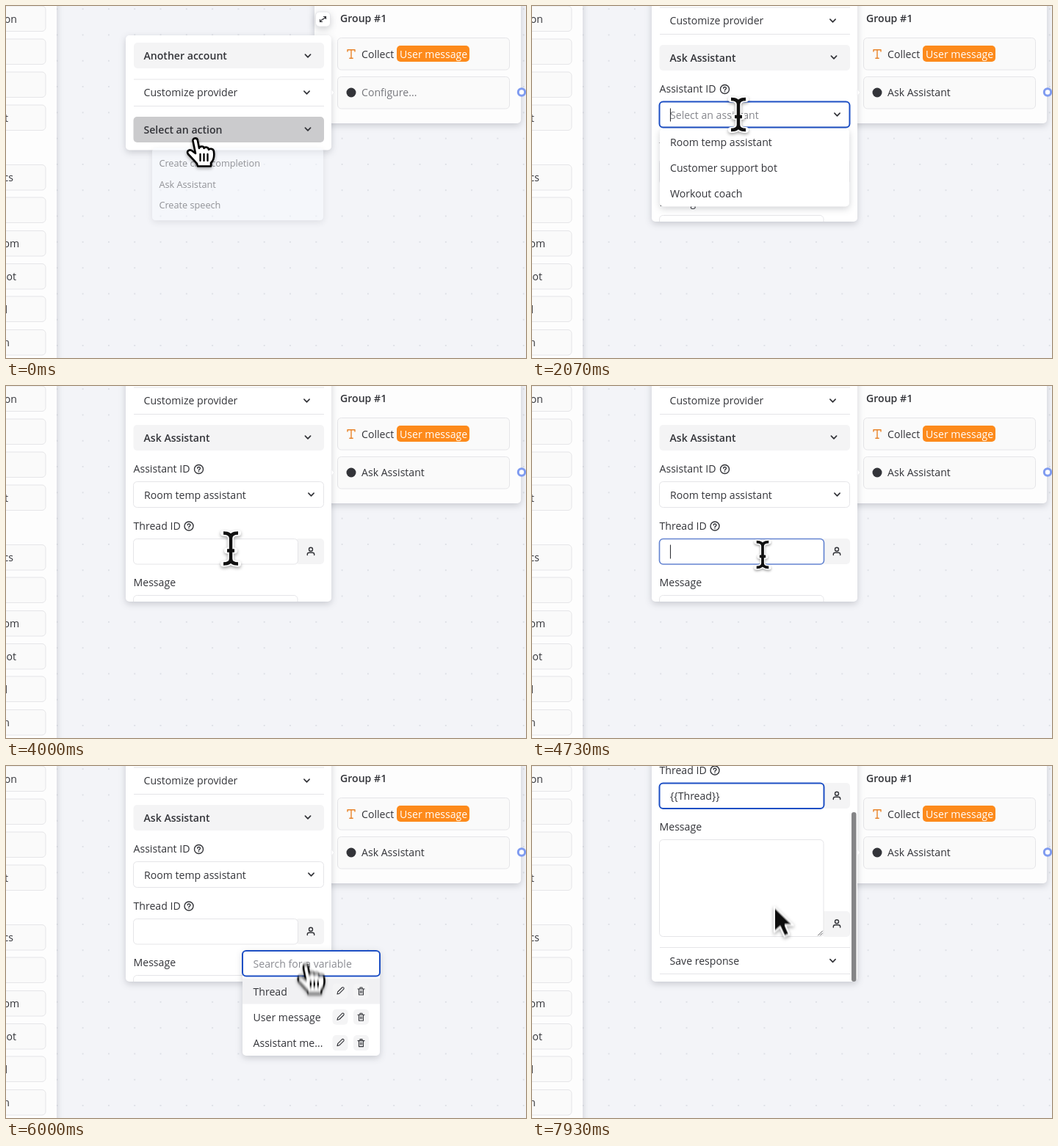
Animation, 708 px wide and 480 px high, one loop 8 s. Source, as an HTML page:

```html
<!DOCTYPE html>
<html lang="en">
<head>
<meta charset="utf-8">
<title>Assistant setup</title>
<style>
html, body { margin: 0; width: 100%; height: 100%; overflow: hidden; background: #f3f4f8; }
svg { display: block; width: 708px; height: 480px; font: 14.1px "Open Sans", "Noto Sans", sans-serif; }
.soft { filter: drop-shadow(0 3px 5px rgba(30, 35, 50, .2)); }
.line { fill: none; stroke: #333439; stroke-width: 1.4; stroke-linecap: round; stroke-linejoin: round; }
#cursor { filter: drop-shadow(0 2px 2px rgba(0, 0, 0, .35)); }
</style>
</head>
<body>
<svg id="stage" viewBox="0 0 708 480"></svg>
<script>
const LOOP = 8000, INK = '#333439', PALE = '#f4f4f5', EDGE = '#e5e5e8', BLUE = '#1d4fc4';
const $ = id => document.getElementById(id);

// Drawing helpers; text is placed by the middle of its line.
const text = (x, y, s, o = '') => `<text x="${x}" y="${y + 5}" fill="${INK}" ${o}>${s}</text>`;
const bold = (x, y, s, o = '') => text(x, y, s, 'font-weight="600" ' + o);
const label = (x, y, s) => text(x, y, s, 'font-weight="500"');
const box = (x, y, w, h, fill, o = '') => `<rect x="${x}" y="${y}" width="${w}" height="${h}" rx="5" fill="${fill}" ${o}/>`;
const framed = (x, y, w, h, fill = '#fff', o = '') => box(x, y, w, h, fill, `stroke="${EDGE}" ` + o);
const path = (d, o = 'class="line"') => `<path d="${d}" ${o}/>`;
const rule = y => path(`M174 ${y}H433`, `stroke="${EDGE}"`);
const chevron = (x, y) => path(`M${x - 3.6} ${y - 1.8}l3.6 3.6l3.6 -3.6`, 'class="line" style="stroke-width:1.7"');
const help = (x, y) => `<circle cx="${x}" cy="${y}" r="6" class="line"/>` +
  path(`M${x - 1.8} ${y - 1.3}c0 -2.4 3.8 -2.2 3.8 0c0 1.5 -2 1.4 -2 2.8m0 1.6v.1`);
const person = (x, y) => `<circle cx="${x}" cy="${y - 2.8}" r="2.5" class="line"/>` +
  path(`M${x - 4.7} ${y + 5}v-1q0 -2.3 2.4 -2.3h4.6q2.4 0 2.4 2.3v1`);
const pencil = (x, y) => path(`M${x - 4} ${y + 4}l.7 -3l6 -6q1.2 -.6 2 .2t.2 2l-6 6z`, 'class="line" style="stroke-width:1.1"');
const trash = (x, y) => path(`M${x - 4.5} ${y - 3}h9m-6 0v-2h3v2m-4.5 0v8h6v-8m-4 2.5v3m2 -3v3`, 'class="line" style="stroke-width:1.1"');
const group = (id, body, o = '') => `<g id="${id}" ${o}>${body}</g>`;

const sideRows = [[17, 'on', 15], [62, '', 0], [107, '', 0], [152, 't', 3], [233.5, 'cs', 10], [278, '', 0],
  [323.5, 'om', 18], [368.5, 'oot', 14], [413, 'l', 2], [458.5, 'n', 5]];
const sidebar = '<rect x="-20" y="-20" width="89" height="520" fill="#fdfdfd" class="soft"/>' +
  sideRows.map(([y, s, x]) => framed(-20, y - 17, 74, 34.5, '#fafafa') +
    text(x, y + .5, s, 'text-anchor="end"')).join('');

const card = box(420, -40, 281, 200, '#fdfdfd', 'class="soft"') + bold(455, 17, 'Group #1') +
  framed(451.5, 43.5, 234, 43.5, '#fafafa') + framed(451.5, 96.5, 234, 43.5, '#fafafa') +
  path('M465 62v-2.3h10v2.3m-5 -2.3v11.6m-2.2 0h4.4', 'class="line" style="stroke:#e8832a"') +
  text(484, 65.5, 'Collect') + box(532, 54, 99, 22, '#fd8a1b') + text(536, 65.5, 'User message', 'style="fill:#fff"') +
  `<circle cx="470" cy="118" r="6.5" fill="${INK}"/>` +
  '<text id="step" x="484" y="123"></text>' +
  '<circle cx="702" cy="117.500" r="4.700" fill="#fff" stroke="#7f9bf0" stroke-width="3"/>';

const expand = framed(421.5, 8, 20, 20, '#fff', 'class="soft"') +
  path('M432.500 14.500h3v3m0 -3l-3.500 3.500m-1.500 3.500h-3v-3m0 3l3.500 -3.500', 'class="line" style="stroke-width:1.2"');

const rows = box(174, -48, 259, 35, PALE) + bold(187.5, -30, 'Another account') + chevron(411, -30) +
  rule(2) + text(187.5, 20, 'Customize provider') + chevron(409.5, 20) + rule(38.5) +
  box(173.5, 53, 259.5, 35, PALE, 'id="actionBox"') +
  bold(187.5, 70.5, '', 'id="action"') + chevron(411, 70);

const fields = label(173.5, 113, 'Assistant ID') + help(262.5, 113.5) +
  framed(173.5, 130.5, 259, 35, '#fff', 'id="pick"') + text(188, 148.5, '', 'id="picked"') + chevron(415.5, 148) +
  label(173.5, 190.5, 'Thread ID') + help(249, 191) + box(394, 208, 39, 35, PALE) +
  framed(173.5, 208.5, 224, 34.5, '#fff', 'id="thread"') + text(188, 226, '', 'id="threadText"') + person(415, 225.5) +
  label(173.5, 268, 'Message') + box(394, 383, 39, 35, PALE) + framed(173.5, 285.5, 223.5, 132) +
  path('M389.500 416l6 -6m-3 6l3 -3', 'class="line" style="stroke-width:.8"') + person(415, 400) +
  rule(432.5) + text(187.5, 450.5, 'Save response') + chevron(409.5, 450.5) + rule(468.5);

const menu = box(173.5, 194, 258.5, 109, '#f7faff', 'class="soft"') +
  '<rect id="menuHover" x="174" y="232" width="258" height="32" fill="#eceef2"/>' +
  ['Create chat completion', 'Ask Assistant', 'Create speech'].map((s, i) => text(184, 217 + i * 31.75, s)).join('');

const options = box(174, 167, 258, 106.5, '#fff', 'class="soft"') +
  '<rect id="optionHover" x="174" y="167" width="258" height="35.500" fill="#dfe0e5"/>' +
  ['Room temp assistant', 'Customer support bot', 'Workout coach'].map((s, i) => text(188, 185.5 + i * 35.3, s)).join('');

const variables = box(322, 251, 187, 144, '#fff', 'class="soft"') +
  '<rect x="322" y="289.500" width="187" height="35" fill="#f1f1f3"/>' +
  box(322, 252, 187, 34.5, '#fff', `stroke="${BLUE}" stroke-width="2"`) +
  text(336.5, 269.5, 'Search for a variable', 'style="fill:#8b8c92"') +
  ['Thread', 'User message', 'Assistant me...'].map((s, i) => {
    const y = 307 + i * 35.3;
    return text(336.5, y + .5, s) + [455, 483.5].map(x => box(x - 10.5, y - 10.5, 21, 21, PALE)).join('') +
      pencil(455, y) + trash(483.5, y);
  }).join('');

const beam = 'M-10 -21Q0 -21 0 -14V14Q0 21 -10 21M10 -21Q0 -21 0 -14M0 14Q0 21 10 21M-5 3H5';
const cursors = {
  hand: path('M-1.500 4C-2 -.5 4.500 -1 5 3.500L7 14C8 10.500 13.500 11 13.500 14C15 11.500 20 12.500 20 16C22 13.500 27 15 27 19C28 26 27 30 23 34V38.500H5L4 35C0 31 -3 27 -8 22C-11 18 -6 14.500 -2 18L2 21Z',
    'fill="#fff" stroke="#000" stroke-width="2.600" stroke-linejoin="round"') +
    path('M8.500 22v9m5 -9v9m5 -9v9', 'stroke="#000" stroke-width="2.300" stroke-linecap="round"'),
  beam: path(beam, 'fill="none" stroke="#fff" stroke-width="8" stroke-linecap="round"') +
    path(beam, 'fill="none" stroke="#111" stroke-width="4.500"'),
  arrow: path('M0 0V35L8 28L14 41L20.500 38L15 25.500H26Z', 'fill="#111" stroke="#fff" stroke-width="2.200" stroke-linejoin="round"')
};

$('stage').innerHTML = `<defs>
  <pattern id="dots" x="87" y="163" width="35.300" height="35.300" patternUnits="userSpaceOnUse"><circle cx="17.600" cy="17.600" r=".9" fill="#d3d6dd"/></pattern>
  <clipPath id="clip"><rect id="clipBox" x="163" width="280" rx="4"/></clipPath>
  <filter id="smear" x="-50%" y="-50%" width="200%" height="200%"><feGaussianBlur id="blur"/></filter></defs>
  <rect width="708" height="480" fill="#f3f4f8"/><rect width="708" height="480" fill="url(#dots)"/>` +
  sidebar + card + group('expand', expand) +
  box(163, 0, 280, 0, '#fff', 'id="panel" class="soft"') + path('M443 114l4 4l-4 4z', 'fill="#fff" stroke="#eeeef0"') +
  `<g clip-path="url(#clip)">${group('content', group('rows', rows) + group('fields', fields))}` +
  '<rect id="bar" x="435" width="6.500" height="231" rx="3" fill="#858587"/></g>' +
  path('', 'id="caret" stroke="#333439" stroke-width="1.100"') +
  group('menu', menu) + group('options', options) + group('variables', variables) +
  group('cursor', group('smeared', Object.keys(cursors).map(k => group(k, cursors[k])).join('')));

const clamp = v => Math.max(0, Math.min(1, v));
const ramp = (t, a, b) => clamp((t - a) / (b - a));
const ease = v => v * v * (3 - 2 * v);
const set = (id, attrs) => { for (const k in attrs) $(id).setAttribute(k, attrs[k]); };
const show = (id, on) => set(id, { display: on ? 'inline' : 'none' });
const write = (id, s, fill = INK) => { $(id).textContent = s; set(id, { fill }); };

// Pointer stops: time, x, y
const stops = [[0, 256, 180], [150, 256, 180], [650, 244, 243], [920, 244, 243], [1500, 281, 148], [2250, 281, 148],
  [2900, 274, 187], [3380, 274, 187], [4250, 314, 230], [4850, 314, 230], [5350, 415, 224], [5780, 415, 224],
  [6180, 400, 305], [6450, 400, 305], [7000, 324, 232], [7600, 324, 232], [8100, 332, 177]];
const shapes = [[0, 'hand'], [950, 'arrow'], [1300, 'beam'], [2460, 'hand'], [3380, 'arrow'],
  [3950, 'beam'], [5180, 'hand'], [6380, 'arrow']];
const clicks = [740, 1790, 3220, 4700, 5500, 6300];

function pointer(t) {
  const i = Math.max(1, stops.findIndex(s => s[0] > t));
  const [a, x, y] = stops[i - 1], [b, x2, y2] = stops[i];
  const k = ease(ramp(t, a, b));
  return [x + (x2 - x) * k, y + (y2 - y) * k];
}

function focus(id, k) {
  const mix = (a, b) => Math.round(a + (b - a) * k);
  set(id, { stroke: `rgb(${mix(229, 29)},${mix(229, 79)},${mix(232, 196)})`, 'stroke-width': 1 + k });
}

function popup(id, t, from, to, x, y) {
  const k = ease(ramp(t, from, from + 200)), out = 1 - ramp(t, to, to + 100), s = .8 + .2 * k;
  show(id, k * out > 0);
  set(id, { opacity: k * out, transform: `translate(${x} ${y}) scale(${s}) translate(${-x} ${-y})` });
}

function drawCursor(t) {
  const [x, y] = pointer(t), [px, py] = pointer(Math.max(0, t - 16));
  const press = Math.max(0, ...clicks.map(c => 1 - Math.abs(t - c) / 130));
  const kind = shapes.filter(s => s[0] <= t).pop()[1];
  const sx = Math.min(3, Math.abs(x - px) * .45), sy = Math.min(3, Math.abs(y - py) * .45);
  for (const k in cursors) show(k, k === kind);
  set('cursor', { transform: `translate(${x} ${y}) scale(${1 - .2 * ease(press)})` });
  set('blur', { stdDeviation: `${sx} ${sy}` });
  set('smeared', { filter: sx + sy > .15 ? 'url(#smear)' : 'none' });
}

function draw(t) {
  const chosen = t >= 880, scroll = 185 * ease(ramp(t, 7080, 7760));
  const frame = chosen ? { y: -58, height: 352 } : { y: 40, height: 156.5 };
  set('panel', frame);
  set('clipBox', frame);
  set('rows', { transform: `translate(0 ${chosen ? 0 : 98})` });
  set('content', { transform: `translate(0 ${-scroll})` });
  show('fields', chosen);
  show('expand', !chosen);
  write('action', chosen ? 'Ask Assistant' : 'Select an action');
  set('actionBox', { fill: t < 150 ? '#cbcbcd' : chosen ? PALE : '#e6e6e8' });
  write('step', chosen ? 'Ask Assistant' : 'Configure...', chosen ? INK : '#77787d');

  const picked = t >= 3290;
  write('picked', picked ? 'Room temp assistant' : 'Select an assistant', picked ? INK : '#85868c');
  focus('pick', picked ? 0 : ramp(t, 1800, 1950) * (1 - .55 * ramp(t, 3140, 3200)));
  write('threadText', t >= 6360 ? '{{Thread}}' : '');
  focus('thread', t < 5540 ? ramp(t, 4660, 4770) : ramp(t, 6380, 6540));

  popup('menu', t, -100, 880, 432, 194);
  show('menuHover', t > 480);
  popup('options', t, 1800, 3290, 303, 167);
  show('optionHover', t > 2720);
  popup('variables', t, 5550, 6360, 415, 251);

  const inPick = t > 1800 && t < 3140, inThread = t > 4680 && t < 5540;
  show('caret', (inPick || inThread) && (t - (inPick ? 1800 : 4680)) % 1000 < 500);
  set('caret', { d: inPick ? 'M188.500 139.500v18' : 'M188.500 216.500v19' });

  show('bar', t > 7080);
  set('bar', { y: -58 + 121 * scroll / 185 });
  drawCursor(t);
}

function tick() {
  draw(performance.now() % LOOP);
  requestAnimationFrame(tick);
}
tick();
</script>
</body>
</html>
```
